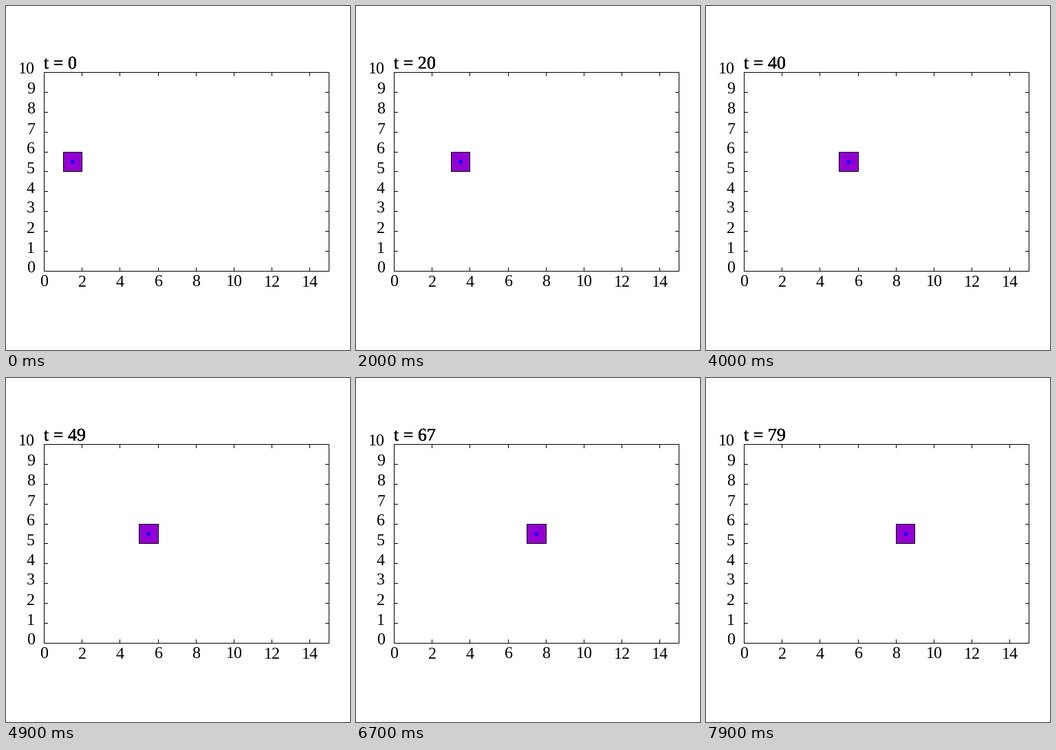
Animation, 500 px wide and 500 px high, one loop 8 s. Source, as a matplotlib script:

```python
import matplotlib.pyplot as plt
from matplotlib.animation import FuncAnimation
from matplotlib.patches import Circle, Rectangle

DPI = 100
PX = 72 / DPI  # points per pixel
LEFT, RIGHT, TOP, BOTTOM = 55, 469, 96, 385
X_MAX, Y_MAX = 15, 10
TICK = 6
FRAMES, INTERVAL = 80, 100

plt.rcParams["font.family"] = "Liberation Serif"
plt.rcParams["text.hinting"] = "no_hinting"

fig = plt.figure(figsize=(500 / DPI, 500 / DPI), dpi=DPI, facecolor="white")
ax = fig.add_axes([0, 0, 1, 1])
ax.set(xlim=(0, 500), ylim=(500, 0))
ax.axis("off")


def px(x):
    return LEFT + x * (RIGHT - LEFT) / X_MAX


def py(y):
    return BOTTOM - y * (BOTTOM - TOP) / Y_MAX


def line(xs, ys):
    ax.plot(xs, ys, color="black", lw=PX, snap=False,
            solid_capstyle="butt", zorder=3)


def label(x, y, text, size, ha):
    return ax.text(x, y, text, fontsize=size * PX, ha=ha, va="baseline",
                   color="black", zorder=4)


def box(x0, y0, x1, y1, fill, zorder):
    # Half-pixel offsets put one-pixel strokes on whole pixels
    patch = Rectangle((x0 + 0.5, y0 + 0.5), x1 - x0, y1 - y0, facecolor=fill,
                      edgecolor="black", lw=PX, snap=False,
                      joinstyle="miter", zorder=zorder)
    return ax.add_patch(patch)


box(LEFT, TOP, RIGHT, BOTTOM, "none", 3)

for v in range(0, X_MAX, 2):
    x = round(px(v)) + 0.5
    if v:
        line([x, x], [TOP, TOP + TICK])
        line([x, x], [BOTTOM + 1 - TICK, BOTTOM + 1])
    label(x, 408, str(v), 24, "center")

for v in range(Y_MAX + 1):
    y = round(py(v))
    if 0 < v < Y_MAX:
        line([LEFT, LEFT + TICK], [y + 0.5, y + 0.5])
        line([RIGHT + 1 - TICK, RIGHT + 1], [y + 0.5, y + 0.5])
    label(42, y + 3, str(v), 24, "right")

# Overlaid copies give the title its heavier strokes
titles = [label(LEFT, 91, "", 26, "left") for _ in range(4)]

top, bottom = round(py(6)), round(py(5))
cell = box(round(px(1)), top, round(px(2)), bottom, "#9400d3", 1)
dot = ax.add_patch(Circle((px(1.5) + 0.5, py(5.5) + 0.5), px(0.1) - LEFT,
                          color="#0000ff", lw=0, zorder=2))


def update(t):
    col = 1 + t // 10
    x0, x1 = round(px(col)), round(px(col + 1))
    cell.set_x(x0 + 0.5)
    cell.set_width(x1 - x0)
    dot.set_center((px(col + 0.5) + 0.5, py(5.5) + 0.5))
    for title in titles:
        title.set_text(f"t = {t}")
    return [cell, dot, *titles]


anim = FuncAnimation(fig, update, frames=FRAMES, interval=INTERVAL,
                     repeat=True, repeat_delay=0, blit=False)
plt.show()
```
